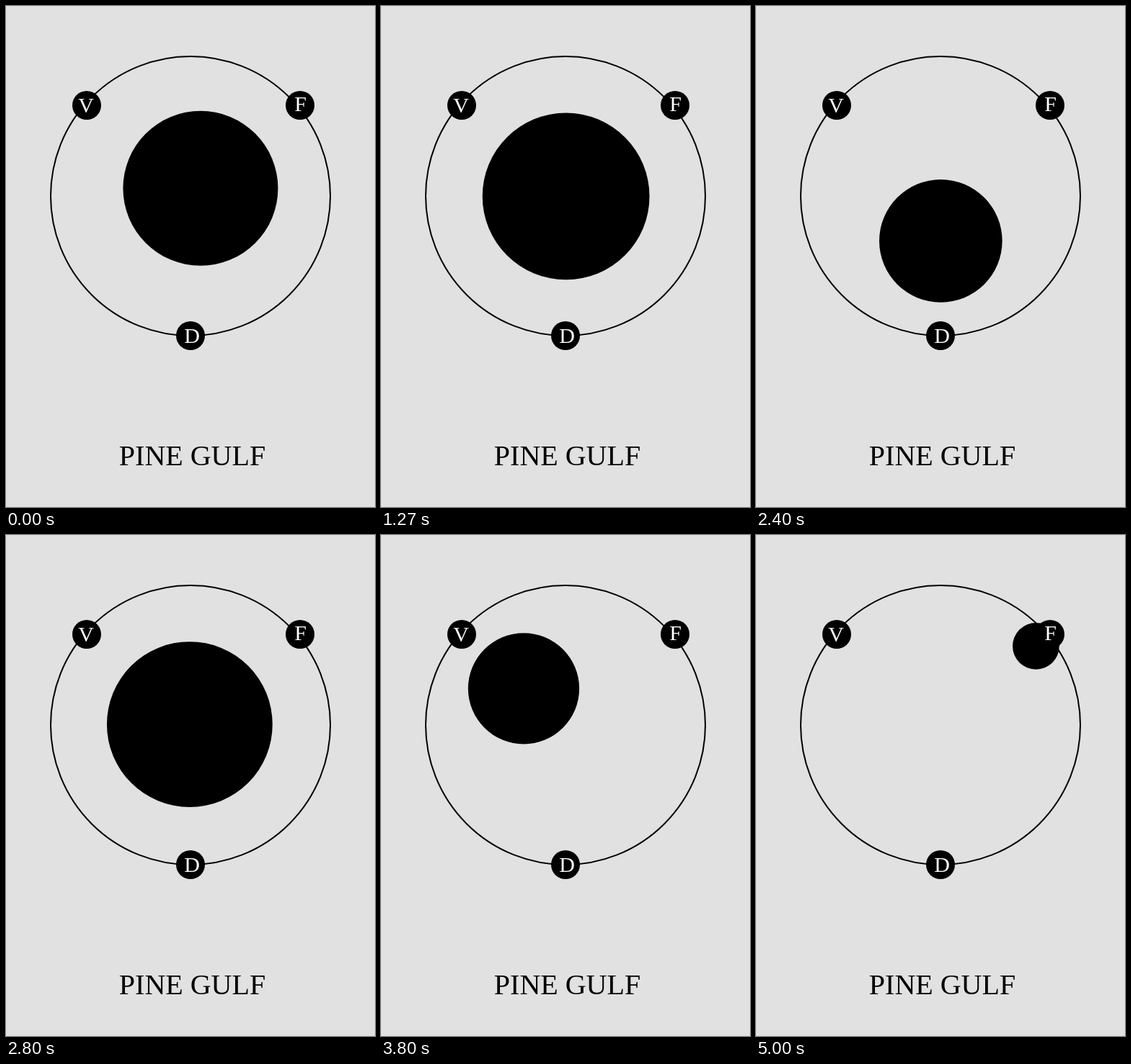
These frames come from a looping animation (512 by 696 pixels, 5.07 s). An HTML page with a canvas:

```html
<!DOCTYPE html>
<html lang="en">
<head>
<meta charset="utf-8">
<title>Pine Gulf</title>
<style>
  html, body { margin: 0; width: 100%; height: 100%; overflow: hidden; background: #e1e1e1; }
  canvas { display: block; }
</style>
</head>
<body>
<canvas id="stage" width="512" height="696"></canvas>
<script>
const ctx = document.getElementById('stage').getContext('2d');
const LOOP = 5070;
const STEP = 200 / 3;
const INK = '#000';
const PAPER = '#e1e1e1';
const SERIF = '"Liberation Serif", serif';

const C = { x: 256.5, y: 264.5, r: 116 };
const V = { x: 112, y: 138, r: 20, label: 'V', tx: 111, ty: 148 };
const F = { x: 408, y: 138, r: 20, label: 'F', tx: 408.5, ty: 146 };
const D = { x: 256, y: 458, r: 20, label: 'D', tx: 258, ty: 468 };

// The disc swells into the centre slowly and leaves for the next node faster.
const route = [
  [-130, C], [495, F], [1284, C], [1850, D], [2755, C],
  [3345, V], [4164, C], [4784, F], [5648, C]
];

// cubic-bezier(.42, 0, .58, 1), solved for x by bisection
function easeInOut(x) {
  let lo = 0, hi = 1;
  for (let i = 0; i < 24; i++) {
    const u = (lo + hi) / 2, w = 1 - u;
    const bx = 3 * w * w * u * 0.42 + 3 * w * u * u * 0.58 + u * u * u;
    if (bx < x) lo = u; else hi = u;
  }
  return lo * lo * (3 - 2 * lo);
}

function discAt(time) {
  const i = route.findIndex(([end]) => end > time);
  const [t0, a] = route[i - 1];
  const [t1, b] = route[i];
  const k = easeInOut((time - t0) / (t1 - t0));
  const mix = key => a[key] + (b[key] - a[key]) * k;
  return { x: mix('x'), y: mix('y'), r: mix('r') };
}

// Fifteen poses a second, with one short hold after the first node.
function poseTime(ms) {
  let step = Math.floor((ms % LOOP + 5) / STEP) % 76;
  if (step > 10 && step < 13) step = 10;
  return step * STEP;
}

function circle({ x, y, r }) {
  ctx.beginPath();
  ctx.arc(x, y, r, 0, Math.PI * 2);
}

function write(text, x, y, size, color) {
  ctx.font = `${size}px ${SERIF}`;
  ctx.fillStyle = color;
  ctx.fillText(text, x, y);
}

function draw(ms) {
  ctx.fillStyle = PAPER;
  ctx.fillRect(0, 0, 512, 696);

  ctx.strokeStyle = INK;
  ctx.lineWidth = 2;
  circle({ x: 256, y: 264, r: 194 });
  ctx.stroke();

  ctx.fillStyle = INK;
  circle(discAt(poseTime(ms)));
  ctx.fill();

  ctx.textAlign = 'center';
  for (const node of [V, F, D]) {
    ctx.fillStyle = INK;
    circle(node);
    ctx.fill();
    write(node.label, node.tx, node.ty, 30, '#fff');
  }
  write('PINE GULF', 258.5, 638, 40, INK);
}

const start = performance.now();
function tick() {
  draw(performance.now() - start);
  requestAnimationFrame(tick);
}
tick();
</script>
</body>
</html>
```
